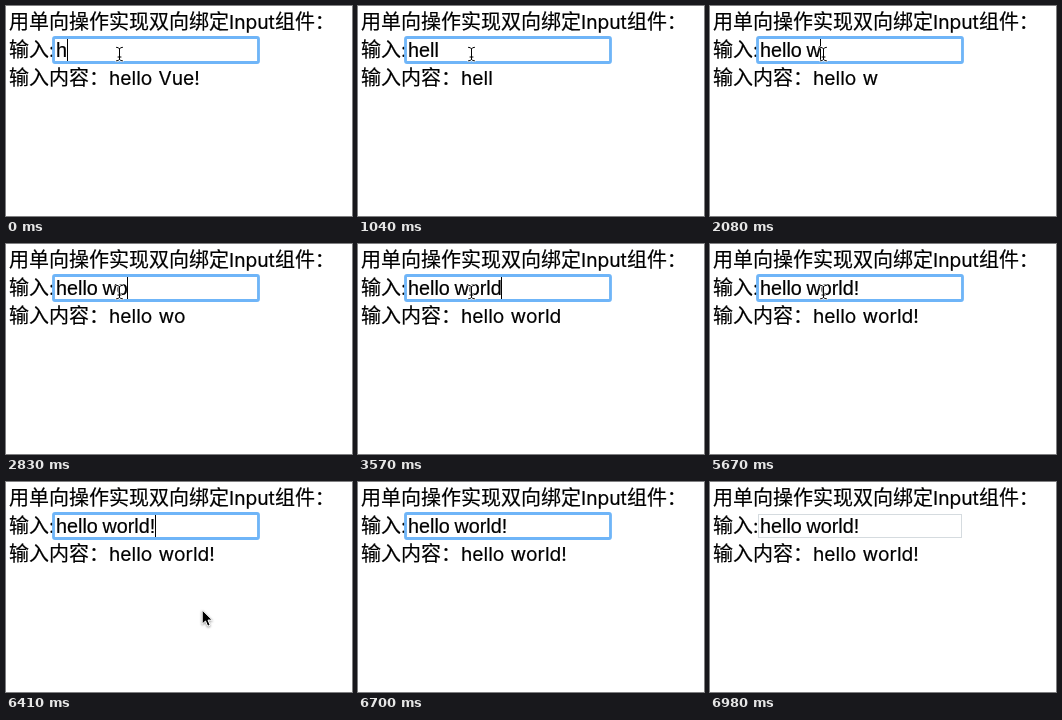
Write an HTML page that moves like this. It is 346x210 px and loops after 7.08 s.

```html
<!DOCTYPE html>
<html lang="zh-CN">
<head>
<meta charset="utf-8">
<title>Input 双向绑定</title>
<style>
  html, body { margin: 0; width: 100%; height: 100%; overflow: hidden; background: #fff; }
  svg { display: block; width: 346px; height: 210px; }
  text { white-space: pre; font: 20px "Noto Sans CJK SC", "Noto Sans CJK", sans-serif; stroke: #000; stroke-width: .2px; }
  .latin { font: 19.2px Inter, sans-serif; word-spacing: .8px; }
  .field { font: 19.8px "Liberation Sans", Arial, sans-serif; word-spacing: -.8px; }
  #ring { fill: none; stroke: #6fb5f8; stroke-width: 2.8px; filter: blur(.5px); }
  #beam { fill: none; stroke-linecap: round; }
  #beam .halo { stroke: #fff; stroke-width: 2.2px; }
  #beam .line { stroke: #000; stroke-width: 1px; }
  #arrow { stroke: #fff; filter: drop-shadow(0 1px 1px #0006); }
</style>
</head>
<body>
<svg viewBox="0 0 346 210">
  <defs>
    <path id="beamShape" d="M1.5 .8Q4 .8 4.5 2.5Q5 .8 7.5 .8M4.5 2.5V12.7M1.5 14.4Q4 14.4 4.5 12.7Q5 14.4 7.5 14.4M3 10.5H6"/>
  </defs>
  <text x="3" y="23">用单向操作实现双向绑定<tspan class="latin">Input</tspan>组件：</text>
  <text x="3" y="51">输入<tspan class="latin">:</tspan></text>
  <text x="3" y="79">输入内容：</text>
  <text id="output" class="latin" x="103" y="79"></text>

  <rect x="48.5" y="32.5" width="203" height="23" fill="#fff" stroke="#d5dbdf"/>
  <rect id="ring" x="47.5" y="31.5" width="205" height="25" rx="1.5"/>
  <text id="input" class="field" x="50" y="51"></text>
  <rect id="caret" y="33" width="1" height="22"/>

  <g id="beam">
    <use href="#beamShape" class="halo"/>
    <use href="#beamShape" class="line"/>
  </g>
  <path id="arrow" d="M1.2 .5V14.6L4.5 11.5L6.7 16.7L9.2 15.7L7 10.6H11.3Z"/>
</svg>
<script>
const LOOP = 7080;
const BLUR_AT = 6980;
const FIELD_X = 50;
const PHRASE = "hello world!";
const KEY_TIMES = [0, 150, 450, 590, 1190, 1640, 2080, 2830, 2970, 3270, 3570, 5220];

const POINTER = [
  { from: 0, kind: "beam", x: 109, y: 40.5 },
  { from: 6120, kind: "beam", x: 113, y: 29 },
  { from: 6260, kind: "beam", x: 115, y: 35 },
  { from: 6410, kind: "arrow", x: 195, y: 127.5 },
  { from: 6560, kind: "arrow", x: 234, y: 162.5 },
  { from: 6700, kind: "none", x: 0, y: 0 },
];

const [output, input, caret, ring, beam, arrow] =
  ["output", "input", "caret", "ring", "beam", "arrow"].map(id => document.getElementById(id));
const show = (node, on) => node.setAttribute("visibility", on ? "visible" : "hidden");

// Every key press restarts the blink 130 ms into its lit phase.
const caretLit = sinceKey => (sinceKey + 130) % 1030 < 580;

function draw(t) {
  const pressed = KEY_TIMES.filter(time => time <= t);
  const text = PHRASE.slice(0, pressed.length);
  input.textContent = text;
  output.textContent = pressed.length > 1 ? text : "hello Vue!";
  caret.setAttribute("x", Math.floor(FIELD_X + input.getComputedTextLength()));
  show(caret, t < BLUR_AT && caretLit(t - pressed.at(-1)));
  show(ring, t < BLUR_AT);

  const { kind, x, y } = POINTER.findLast(step => step.from <= t);
  for (const cursor of [beam, arrow]) {
    show(cursor, cursor.id === kind);
    cursor.setAttribute("transform", `translate(${x} ${y})`);
  }
}

function tick() {
  draw(performance.now() % LOOP);
  requestAnimationFrame(tick);
}
tick();
</script>
</body>
</html>
```
